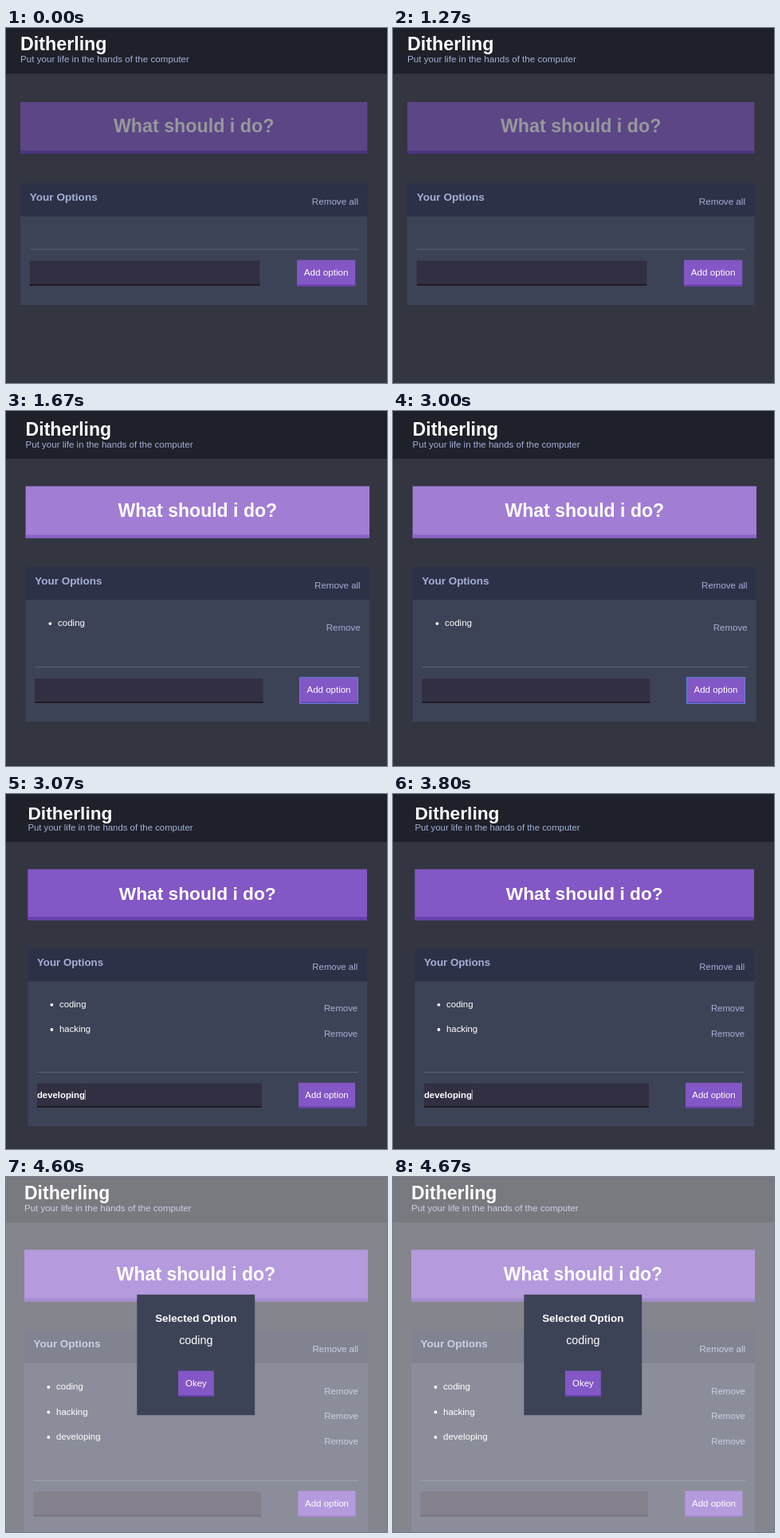
An HTML page that plays this animation: 478 by 446 pixels, repeating every 6.14 s.

```html
<!DOCTYPE html>
<html lang="en">
<head>
<meta charset="utf-8">
<title>Ditherling</title>
<style>
html, body { margin: 0; width: 100%; height: 100%; overflow: hidden; background: #333541; }
svg { display: block; width: 478px; height: 446px; font-family: "Liberation Sans", Arial, sans-serif; }
</style>
</head>
<body>
<svg id="stage" viewBox="0 0 478 446"></svg>
<script>
const LOOP = 6140;
const INK = '#fff', PALE = '#a5afd7', PANEL = '#3d4356', PURPLE = '#8357c5', EDGE = '#6840ae';
const stage = document.getElementById('stage');

function add(parent, tag, attrs, content) {
  const el = document.createElementNS('http://www.w3.org/2000/svg', tag);
  for (const key in attrs) el.setAttribute(key, attrs[key]);
  if (content) el.textContent = content;
  parent.append(el);
  return el;
}

const rect = (g, x1, y1, x2, y2, fill, more) =>
  add(g, 'rect', { x: x1, y: y1, width: x2 - x1, height: y2 - y1, fill, ...more });

const text = (g, content, x, y, size, fill, more) =>
  add(g, 'text', { x, y, 'font-size': size, fill, ...more }, content);

const BOLD = { 'font-weight': 700 };
const MID = { 'text-anchor': 'middle' };
const END = { 'text-anchor': 'end' };

function block(g, [x1, y1, x2, y2], fill, edge, depth) {
  rect(g, x1, y1, x2, y2, fill);
  rect(g, x1, y2 - depth, x2, y2, edge);
}

// em: base text size; left/right: page column; inner/outer: padded column
const scenes = [
  {
    from: 0, to: 1530, em: 11.63, left: 18, right: 453.3, inner: 29.7, outer: 442,
    bar: 57.5, title: 28, sub: 43, hero: [93, 158], heroText: 131.2,
    heroFill: ['#5c4686', '#4b3580', '#96989c'],
    head: [195, 236.7], headText: 216.8, clear: 222, bottom: 348,
    itemX: 58, items: [], rule: 278,
    field: [29.7, 292.3, 318.5, 323.7], button: [365, 291.5, 438.3, 324.5], label: 311
  },
  {
    from: 1530, to: 3070, em: 11.53, left: 24.6, right: 456, inner: 36.2, outer: 444.7,
    bar: 60, title: 30.7, sub: 45.7, hero: [94.5, 159.5], heroText: 133,
    heroFill: ['#a17dd4', '#8c63c8', INK],
    head: [196, 237.3], headText: 217.5, clear: 222.6, bottom: 390.5,
    itemX: 65, items: [['coding', 270.3, 276]], rule: 321.5,
    field: [36.2, 336, 322.5, 367], button: [368.5, 334.8, 441.5, 367.5], label: 354.2,
    focus: true
  },
  {
    from: 3070, to: 4600, em: 11.37, left: 27.4, right: 453, inner: 38.9, outer: 441.2,
    bar: 60.3, title: 31.7, sub: 46.3, hero: [94.5, 158.5], heroText: 132.5,
    heroFill: [PURPLE, EDGE, INK],
    head: [194, 235.5], headText: 216, clear: 220.8, bottom: 417.5,
    itemX: 67, items: [['coding', 268, 273.4], ['hacking', 299.2, 304.6]], rule: 349.5,
    field: [38.9, 363.6, 321, 394], button: [367, 362.8, 438, 394.5], label: 381.6,
    typed: 'developing'
  },
  {
    from: 4600, to: LOOP, em: 11.5, left: 23, right: 454, inner: 34.5, outer: 442,
    bar: 57, title: 27.8, sub: 42.6, hero: [91.5, 156.5], heroText: 130,
    heroFill: [PURPLE, EDGE, INK],
    head: [192, 234], headText: 214.3, clear: 219.6, bottom: 446,
    itemX: 63, items: [['coding', 267.2, 272.7], ['hacking', 298.7, 304.2], ['developing', 330.2, 335.7]],
    rule: 381.5,
    field: [34.5, 395.2, 320.2, 426.5], button: [366.5, 394.5, 438.5, 427], label: 413.7,
    modal: true
  }
];

function drawModal(g, em) {
  rect(g, 0, 0, 478, 446, '#fff', { 'fill-opacity': .4 });
  rect(g, 164.3, 147.7, 312.2, 299.2, PANEL);
  text(g, 'Selected Option', 238.3, 182.4, em * 1.17, INK, { ...BOLD, ...MID });
  text(g, 'coding', 238.3, 210, em * 1.25, INK, MID);
  block(g, [216, 243.5, 260.8, 276], PURPLE, EDGE, 2);
  text(g, 'Okey', 238.4, 262.6, em, INK, MID);
}

function draw(s) {
  const g = add(stage, 'g', {});
  const { em, left, right, inner, outer } = s;
  const [heroFill, heroEdge, heroInk] = s.heroFill;

  rect(g, 0, 0, 478, 446, '#333541');
  rect(g, 0, 0, 478, s.bar, '#1f212a');
  text(g, 'Ditherling', left, s.title, em * 2, INK, BOLD);
  text(g, 'Put your life in the hands of the computer', left, s.sub, em, PALE);

  block(g, [left, s.hero[0], right, s.hero[1]], heroFill, heroEdge, 4);
  text(g, 'What should i do?', (left + right) / 2, s.heroText, em * 2, heroInk, { ...BOLD, ...MID });

  rect(g, left, s.head[0], right, s.head[1], '#2d3147');
  text(g, 'Your Options', inner, s.headText, em * 1.17, PALE, BOLD);
  text(g, 'Remove all', outer, s.clear, em, PALE, END);

  rect(g, left, s.head[1], right, s.bottom, PANEL);
  for (const [name, y, removeY] of s.items) {
    add(g, 'circle', { cx: s.itemX - 9.6, cy: y - 3.2, r: 1.9, fill: INK });
    text(g, name, s.itemX, y, em, INK);
    text(g, 'Remove', outer, removeY, em, PALE, END);
  }
  rect(g, inner, s.rule - .5, outer, s.rule + .6, '#596077');

  block(g, s.field, '#332f43', '#1d1c24', 2);
  if (s.typed) {
    text(g, s.typed, s.field[0], s.label, em, INK, BOLD);
    rect(g, 98.8, s.label - 10, 99.6, s.label + 2.5, '#c8c8d0');
  }

  block(g, s.button, PURPLE, EDGE, 2);
  if (s.focus) {
    const [x1, y1, x2, y2] = s.button;
    rect(g, x1, y1, x2, y2, 'none', { stroke: '#5c86dc', 'stroke-width': 1 });
  }
  text(g, 'Add option', (s.button[0] + s.button[2]) / 2, s.label, em, INK, MID);

  if (s.modal) drawModal(g, em);
  return g;
}

const layers = scenes.map(draw);

function tick() {
  const t = performance.now() % LOOP;
  scenes.forEach((s, i) => {
    layers[i].style.display = t >= s.from && t < s.to ? '' : 'none';
  });
  requestAnimationFrame(tick);
}
tick();
</script>
</body>
</html>
```
